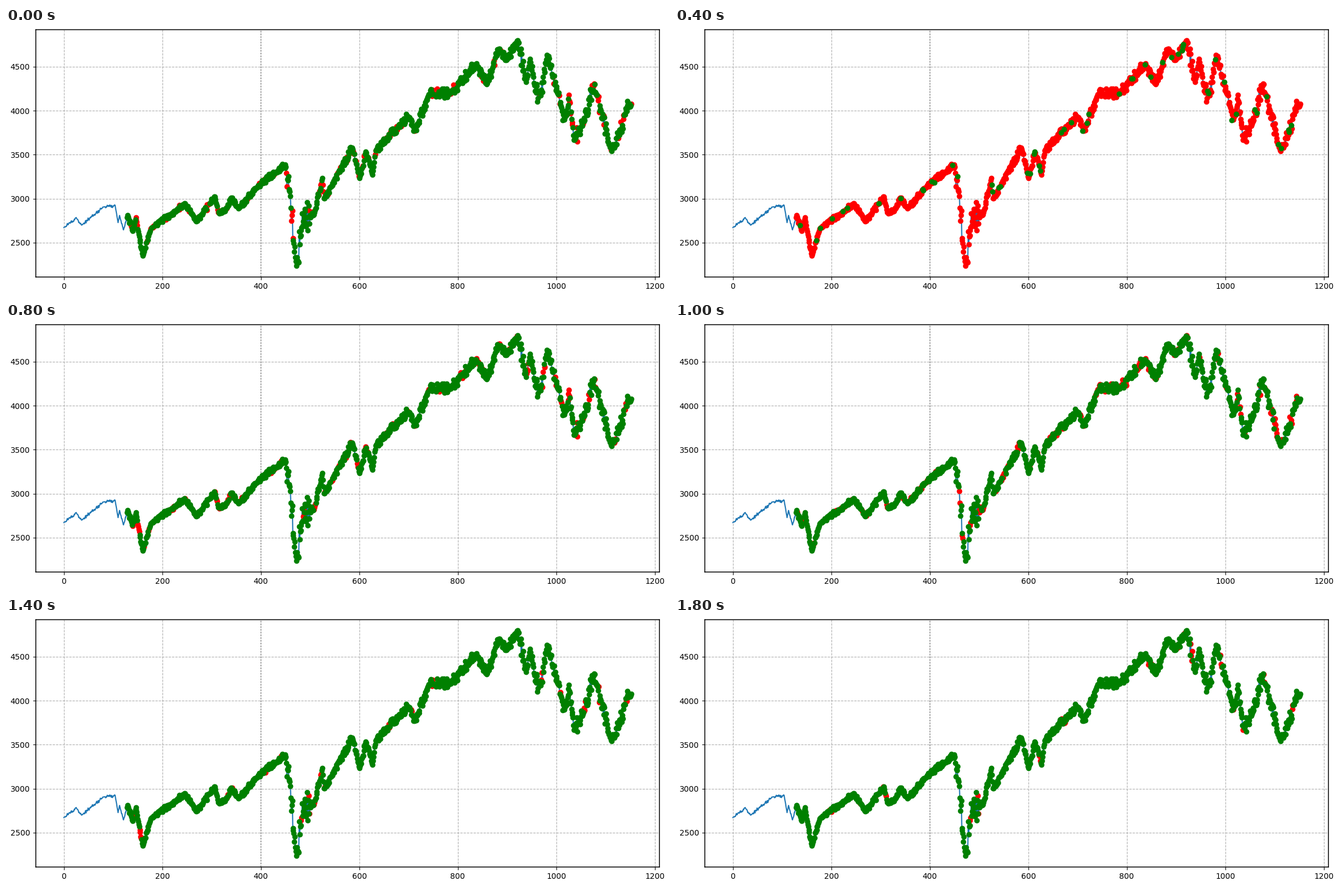
Animation, 1178 px wide and 475 px high, one loop 2000 ms. Source, as a matplotlib script:

```python
import numpy as np
import matplotlib.pyplot as plt
from matplotlib.animation import FuncAnimation

W, H, DPI = 1178, 475, 100
DAYS, FIRST = 1153, 128
RED, GREEN = "#ff0000", "#008000"

# Main turning points of the price: (day, price)
TURNS = [
    (0, 2672), (25, 2786), (36, 2699), (80, 2905), (104, 2925), (110, 2728),
    (113, 2809), (121, 2645), (129, 2813), (140, 2632), (146, 2790),
    (160, 2351), (176, 2660), (246, 2945), (269, 2744), (307, 3025),
    (313, 2845), (327, 2860), (340, 3009), (355, 2890), (394, 3150),
    (449, 3386), (459, 3080), (472, 2237), (487, 2820), (508, 2820),
    (525, 3232), (528, 3002), (586, 3580), (600, 3236), (613, 3534),
    (627, 3270), (633, 3550), (699, 3935), (712, 3768), (741, 4185),
    (786, 4210), (838, 4537), (859, 4300), (884, 4702), (900, 4580),
    (922, 4797), (939, 4327), (947, 4589), (957, 4225), (968, 4171),
    (981, 4632), (1003, 4200), (1017, 3901), (1026, 4177), (1036, 3667),
    (1054, 3850), (1077, 4305), (1109, 3586), (1118, 3577), (1139, 3960),
    (1152, 4080),
]
# Share of red days and length of a signal in days, per step
STEPS = [(.15, 2), (.12, 2), (.95, 1), (.16, 2), (.12, 2),
         (.16, 2), (.12, 2), (.05, 2), (.62, 4), (.04, 2)]


def price_curve():
    """Straight runs between the turns, roughened by daily volatility."""
    day = np.arange(DAYS)
    turn_day, turn_price = np.transpose(TURNS)
    gap = np.abs(day[:, None] - turn_day).min(axis=1)
    crash = (day > 449) & (day < 500)
    vol = np.select([day < FIRST, crash, day < 449, day < 922],
                    [.004, .035, .0055, .0075], .013)
    noise = np.random.default_rng(7).normal(size=DAYS).clip(-1.8, 1.8)
    base = np.interp(day, turn_day, turn_price)
    return day, base * (1 + vol * noise * np.minimum(gap / 4, 1))


def red_days(step):
    share, run = STEPS[step]
    draws = np.random.default_rng(40 + step).random(DAYS // run + 1)
    return np.repeat(draws < share, run)[:DAYS]


plt.rcParams["font.family"] = "DejaVu Sans"
day, price = price_curve()
traded = day >= FIRST

fig = plt.figure(figsize=(W / DPI, H / DPI), dpi=DPI, facecolor="white")
ax = fig.add_axes([52.5 / W, 32 / H, 1108.4 / W, 440.5 / H])
ax.set_xlim(-57.6, 1209.6)
ax.set_ylim(2109.4, 4924.5)
ax.set_xticks(range(0, 1201, 200))
ax.set_yticks(range(2500, 4501, 500))
ax.spines[:].set_linewidth(1.1)
ax.grid(True, linestyle="--", color="#b0b0b0", linewidth=0.8)
ax.get_xgridlines()[2].set(color="#8c8c8c", linewidth=1.1,
                           linestyle=(0, (2, 1.2)))

ax.plot(day, price, color="#1f77b4", linewidth=1.5)
red_dots, = ax.plot([], [], "o", color=RED)
green_dots, = ax.plot([], [], "o", color=GREEN)


def draw(step):
    red = red_days(step)
    for dots, mask in ((red_dots, red), (green_dots, ~red)):
        shown = mask & traded
        dots.set_data(day[shown], price[shown])
    return red_dots, green_dots


anim = FuncAnimation(fig, draw, frames=len(STEPS), interval=200,
                     repeat=True, repeat_delay=0)
plt.show()
```
